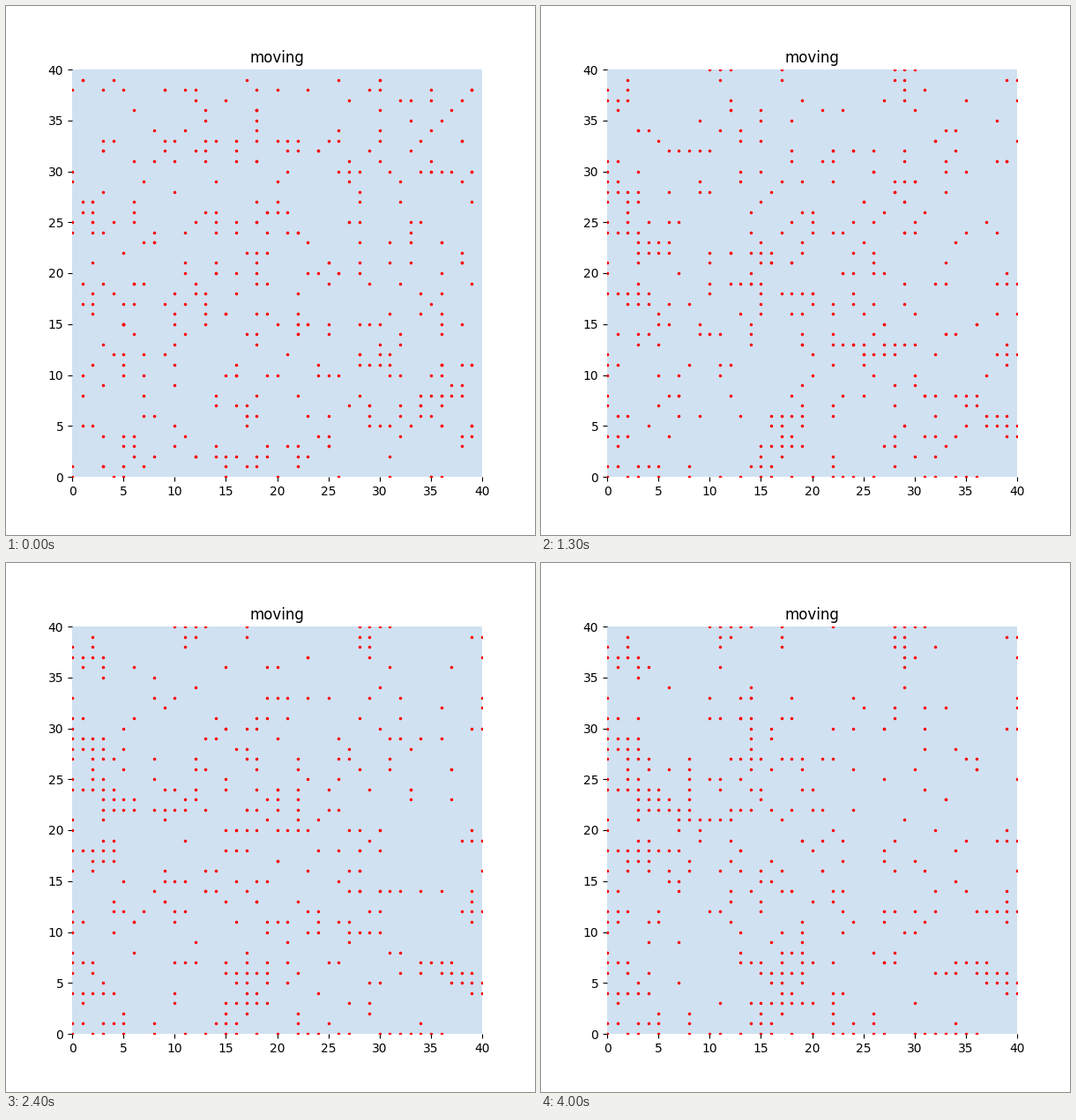
These frames come from a looping animation (600x600 px, 4.1 s). A matplotlib script:

```python
import matplotlib.pyplot as plt
import numpy as np
from matplotlib.animation import FuncAnimation

SIZE = 40
WALKERS = 400
FRAMES = 41
INTERVAL = 100

STEPS = (-1, 0, 1)
X_ODDS = (0.48, 0.17, 0.35)
Y_ODDS = (0.44, 0.17, 0.39)
STICK = {"left": 0.95, "bottom": 0.4, "right": 0.7, "top": 0.2}
ATTACH = 0.85


def stick_chance(grid, x, y):
    """Chance to stop here, next to a wall or to a stopped neighbour."""
    wall = max(STICK["left"] * (x == 0), STICK["right"] * (x == SIZE),
               STICK["bottom"] * (y == 0), STICK["top"] * (y == SIZE))
    # the grid has a margin of one cell
    beside = (grid[x, y + 1] or grid[x + 2, y + 1]
              or grid[x + 1, y] or grid[x + 1, y + 2])
    return max(wall, ATTACH * beside)


def simulate(seed):
    rng = np.random.default_rng(seed)
    pos = rng.integers(0, SIZE, (WALKERS, 2))
    free = np.ones(WALKERS, bool)
    grid = np.zeros((SIZE + 3, SIZE + 3), bool)
    history = [pos.copy()]
    for _ in range(FRAMES - 1):
        move = np.column_stack([rng.choice(STEPS, WALKERS, p=X_ODDS),
                                rng.choice(STEPS, WALKERS, p=Y_ODDS)])
        luck = rng.random(WALKERS)
        for i in np.flatnonzero(free):
            x, y = pos[i]
            if not grid[x + 1, y + 1] and luck[i] < stick_chance(grid, x, y):
                free[i] = False
                grid[x + 1, y + 1] = True
                continue
            x, y = np.clip(pos[i] + move[i], 0, SIZE)
            if not grid[x + 1, y + 1]:
                pos[i] = x, y
        history.append(pos.copy())
    return history


history = simulate(1)

fig, ax = plt.subplots(figsize=(6, 6), dpi=100)
ax.set_facecolor("#d0e1f2")
ax.set(xlim=(0, SIZE), ylim=(0, SIZE), title="moving")
ax.set_xticks(range(0, SIZE + 1, 5))
ax.set_yticks(range(0, SIZE + 1, 5))
for spine in ax.spines.values():
    spine.set_visible(False)
dots, = ax.plot([], [], "r.", markersize=3)


def update(frame):
    dots.set_data(*history[frame].T)
    return dots,


anim = FuncAnimation(fig, update, frames=FRAMES, interval=INTERVAL,
                     init_func=lambda: update(0), repeat=True, repeat_delay=0)
plt.show()
```
